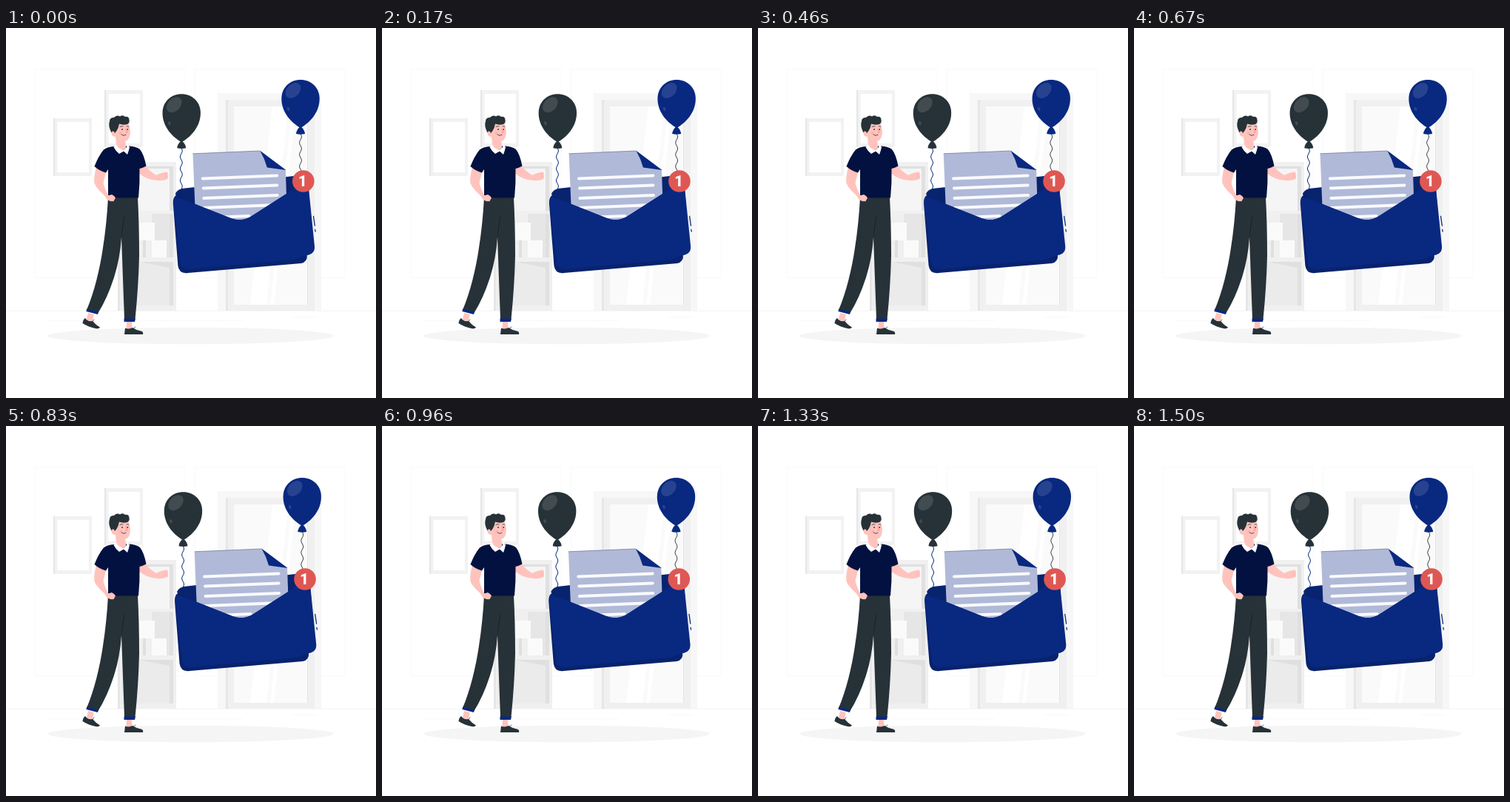
An HTML page for the animation above (1540 ms loop, 500 px wide and 500 px high).

```html
<!DOCTYPE html>
<html lang="en">
<head>
<meta charset="utf-8">
<title>New message</title>
<style>
  html, body { margin: 0; height: 100%; overflow: hidden; background: #fff; }
  svg { display: block; width: 100vw; height: 100vh; }
  .ink { fill: #263238; }
  .skin { fill: #ffc3bd; }
  .navy { fill: #092880; }
  .line { fill: none; stroke: #263238; stroke-linecap: round; }
  .blue { stroke: #092880; }
</style>
</head>
<body>
<svg viewBox="0 0 500 500">
  <defs>
    <g id="balloon">
      <path d="M0 65C-11 59-25.700 45-25.700 25.700C-25.700 10-14 0 0 0S25.700 10 25.700 25.700C25.700 45 11 59 0 65Z"/>
      <path d="M-1.500 64Q-5.500 68-6 73Q0 74.500 6 73Q5.500 68 1.500 64Z"/>
      <g fill="#fff" opacity=".12">
        <ellipse cx="-10" cy="14.500" rx="8.500" ry="12" transform="rotate(43 -10 14.500)"/>
        <ellipse cx="-16.500" cy="39.500" rx="1.700" ry="2.800" transform="rotate(-20 -16.500 39.500)"/>
      </g>
    </g>
  </defs>

  <g id="room">
    <g fill="none" stroke="#f9f9f9">
      <rect x="39.500" y="55.500" width="203" height="282" rx="2"/>
      <rect x="255.500" y="55.500" width="203" height="282" rx="2"/>
    </g>
    <path d="M0 382.300H500" stroke="#f0f0f0" stroke-width=".7"/>
    <path d="M57 395.500H105M180 395.500H320M387 390.500H420" stroke="#f5f5f5" stroke-width=".6"/>

    <path fill="#f2f2f2" d="M64 122H116V200H64ZM133 84H185V161H133Z"/>
    <path fill="#e6e6e6" d="M64 122H66V200H64ZM133 84H135V161H133Z"/>
    <path fill="#fff" d="M69.500 127H112V195H69.500ZM138.500 89H181V156H138.500Z"/>

    <path fill="#f0f0f0" d="M151 181H230V382H151Z"/>
    <path fill="#e6e6e6" d="M151 181H154V382H151Z"/>
    <path fill="#f5f5f5" d="M156 187H226V247H156Z"/>
    <path fill="#f0f0f0" d="M156 251H197V310H156Z"/>
    <path fill="#e6e6e6" d="M197 251H226V310H197Z"/>
    <path fill="#ebebeb" d="M156 316H226V375H156Z"/>
    <path fill="#e0e0e0" d="M221 187H226V247H221ZM221 251H226V310H221ZM221 316H226V375H221ZM180 187H221V190H180ZM180 316L221 324V316Z"/>
    <path fill="#fafafa" d="M180 263H201V287H180ZM197 287H217V310H197Z"/>
    <path fill="#e0e0e0" d="M185 287H189V310H185Z"/>

    <path fill="#f7f7f7" d="M286 88H426V382H286Z"/>
    <path fill="#f0f0f0" d="M297 97H417V382H297Z"/>
    <path fill="#e6e6e6" d="M297 97H300V382H297ZM407 106H408V374H308V373H407Z"/>
    <path fill="#fafafa" d="M308 106H407V374H308Z"/>
    <path fill="#fff" d="M330 374L360 106H382L352 374ZM357 374L387 106H392L362 374Z"/>
    <ellipse cx="249.500" cy="416" rx="193.500" ry="11.300" fill="#f5f5f5"/>
  </g>

  <g id="man">
    <path class="skin" d="M111 385L118.500 387L117 397L109 394ZM163 396H170L170.500 408H162.500Z"/>
    <path class="ink" d="M107 392Q110 397 117 396Q122 402 127 404.500Q126 407 121 406Q111 404 103.500 399Q104 394 107 392ZM161 405.500Q166 407.500 171 405Q177 409 184 410Q186 412 185 414H160Z"/>
    <path class="line" d="M116 398L119 394M171 407L175 404" stroke-width=".7"/>
    <path class="ink" d="M138 229H178Q180 266 180 308Q179 350 174.500 393.500H160Q158 340 156 283Q154 312 146 337Q137 365 124.500 385L109 381C119 358 127 325 131 297Q136 265 138 229Z"/>
    <path d="M161 249Q157 266 156 285Q158 270 161 249Z" fill="#11191d"/>
    <path class="navy" d="M109 379.500L125 383.500L124 387L108.500 383ZM159.500 392.500H175L174 397H159.500Z"/>

    <path class="skin" d="M122 188Q118 203 119.500 210Q122 217 136 229L143 225L138 226Q134 219 131.500 209L136 192Z"/>
    <path class="skin" d="M179 187L188 185Q193 193 203 199Q210 195 218 194.500Q219.500 199 218.500 204Q212 207 204 206Q190 205 179 196Z"/>
    <path d="M214 198L218 197.500M214 201H218" stroke="#f4a39b" stroke-width=".5"/>
    <path fill="#02113f" d="M147 160Q136 160.500 131.500 165Q125 173 119.500 187Q126 193 135 195.500L138 191V229.500H179Q181 210 180.500 190Q185 189 189.500 186.500Q186.500 171 181 164Q176 160 166 159.500Z"/>
    <path class="skin" d="M133 226Q138 227 143 225Q147 227 148 229.500L145.500 234Q139 235 135 230Z"/>
    <path class="skin" d="M148 146L161 150L162 160Q163 166 158 167Q152 164 149 159Z"/>
    <path fill="#fff" d="M149 157.500Q151 163 159 165.500Q163 164 164 156L167 161Q166 166 164 171L159 166.500L153 170Q148 166 145.500 161Z"/>
    <path class="skin" d="M144 139Q145 127 154 124Q163 122 166 130L168 140Q167.500 152.500 160 153Q152 153 148.500 147Q143 147 142.500 143Q142 140 144 139Z"/>
    <path class="ink" d="M142.500 141.500Q137.500 132 140 126Q140 121 146 121Q150 117 154 119.500Q158 117 161 120Q166 119 166.500 124Q167.500 128 164 130Q158 131.500 153 129.500Q152 135 149.500 139L147 142Q145 137 142.500 141.500Z"/>
    <path class="line" d="M154 133.500Q156 132 158 133M163 133Q165 132 166 133.500M156 144Q159 146.500 162 144.500" stroke-width=".8"/>
    <circle class="ink" cx="157" cy="137" r=".9"/><circle class="ink" cx="164.300" cy="137" r=".9"/>
    <path d="M161.500 136Q163 139.500 164 141L161.500 141.500" fill="none" stroke="#ed847e" stroke-width=".8"/>
    <circle cx="154.500" cy="142" r="1.800" fill="#ff9c95" opacity=".5"/>
  </g>

  <g id="mail">
    <path id="leftString" class="line blue"/>
    <use href="#balloon" class="ink" x="237.400" y="89.300"/>
    <use href="#balloon" class="navy" x="398.200" y="70"/>

    <path fill="#08246f" d="M229 224Q231 219 238 217L398 199Q407 198 408 207L411 240L240 250Z"/>
    <path fill="#b0b9d7" d="M252.700 169.800L343.500 166L378 191.500L379.500 235L318 275L256 250Z"/>
    <path d="M252.700 169.800L343.500 166" stroke="#53628f" stroke-width=".6"/>
    <path class="navy" d="M343.500 165.700L378.500 192L353 188.500Q350 177 343.500 165.700Z"/>
    <path d="M266 203.400L366.500 199.400M267 216.500L366.500 212.500M267.500 230L367 226M268 243L367 239M269 256.500L328.500 254" stroke="#f9faff" stroke-width="4" stroke-linecap="round"/>

    <path class="navy" d="M380 223L408 205L417.200 295Q418 305 407 307L350 300Z"/>
    <path fill="#08226d" d="M226 237Q225.500 229 230 226L256 238L304 257Q318 262 330 255.500L380 223.500L400 216L407 306Q408 316 399 318L246 331Q234 332.500 232.500 321Z"/>
    <path class="navy" d="M226.800 236Q227 230 230 228L256 238L304 257Q318 262 330 255.500L380 223.500L400 212L409 306L391 313L247 326Q238 326 236 318Z"/>

    <path id="rightString" class="line" stroke-width=".9"/>
    <circle cx="402" cy="207" r="14.800" fill="#df5753"/>
    <text x="401" y="214.200" text-anchor="middle" font-family="Roboto, sans-serif" font-size="20" font-weight="900" fill="#fff">1</text>
    <path d="M415.700 254.500L417.500 267M417.900 272.500L418.300 275" class="line blue" stroke-width="1.300"/>
  </g>
</svg>
<script>
  const LOOP = 1540, STEPS = 37, STEP_MS = 1000 / 24;
  const SHAKE_MS = 1500, LEAD_MS = 30;
  const shake = [0, -1, 2, -4, 4, -4, 4, -4, 2, -1, 0];
  const mail = document.getElementById('mail');

  function drawString(id, x, top, bottom) {
    let d = '';
    for (let y = top; y <= bottom; y++) {
      const wave = 1.4 * Math.sin((y - top) / 16 * 2 * Math.PI);
      d += (d ? 'L' : 'M') + (x + wave).toFixed(2) + ' ' + y;
    }
    document.getElementById(id).setAttribute('d', d);
  }

  // Linear shake between evenly spaced offsets, sampled at 24 steps a second.
  function offsetAt(ms) {
    const step = Math.min(STEPS - 1, Math.floor(ms / LOOP * STEPS + 0.1));
    const pos = Math.min(1, (step * STEP_MS + LEAD_MS) / SHAKE_MS) * 10;
    const i = Math.min(9, Math.floor(pos));
    return shake[i] + (shake[i + 1] - shake[i]) * (pos - i);
  }

  function draw() {
    mail.setAttribute('transform', `translate(${offsetAt(performance.now() % LOOP)} 0)`);
    requestAnimationFrame(draw);
  }

  drawString('leftString', 237, 162, 219);
  drawString('rightString', 398.2, 143, 193);
  draw();
</script>
</body>
</html>
```
